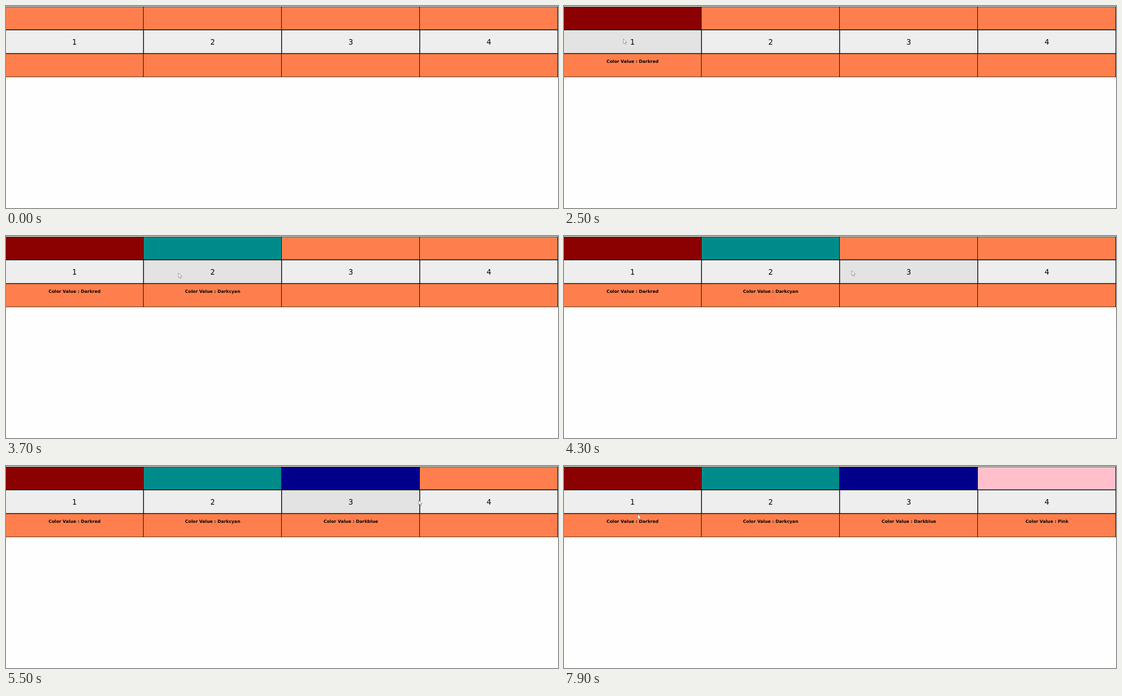
An HTML page for the animation above (8000 ms loop, 999 by 366 pixels).

```html
<!DOCTYPE html>
<html lang="en">
<head>
<meta charset="utf-8">
<title>Color buttons</title>
<style>
  html, body { margin: 0; width: 100%; height: 100%; overflow: hidden; background: #fefefe; }
  svg { display: block; }
  text { font-family: "DejaVu Sans", sans-serif; text-anchor: middle; fill: #000; }
  .digit { font-size: 13.3px; }
  .label { font-size: 7.8px; font-weight: bold; }
</style>
</head>
<body>
<svg id="stage" width="999" height="366" viewBox="0 0 999 366"></svg>
<script>
const stage = document.getElementById('stage');
const LOOP = 8000, STEP = 100, GLIDE = 1000, REACTION = 200;
const COLUMN = 250, ROW = 43;
const CORAL = '#fe7f4d', IDLE = '#eee', HOVER = '#e3e3e3';

// Each name is also the CSS colour; x and y are where the button is clicked.
const choices = [
  { name: 'Darkred', x: 95, y: 59, click: 2000 },
  { name: 'Darkcyan', x: 310, y: 67, click: 3500 },
  { name: 'Darkblue', x: 562, y: 62, click: 4800 },
  { name: 'Pink', x: 833, y: 62, click: 6100 }
];

function add(tag, attrs, content = '') {
  const el = document.createElementNS('http://www.w3.org/2000/svg', tag);
  for (const key in attrs) el.setAttribute(key, attrs[key]);
  el.textContent = content;
  stage.append(el);
  return el;
}

const rect = (x, y, width, height, fill) => add('rect', { x, y, width, height, fill });

const cells = choices.map(({ name }, i) => {
  const left = COLUMN * i - 1, center = COLUMN * i + 124;
  const [top, button] = [CORAL, IDLE, CORAL].map((fill, row) =>
    rect(left, Math.max(1, ROW * row), COLUMN, ROW, fill));
  add('text', { x: center, y: 70, class: 'digit' }, i + 1);
  const label = add('text', { x: center, y: 102.5, class: 'label' }, `Color Value : ${name}`);
  return { left, top, button, label };
});

// Thin outer grid, heavier frame around the buttons
for (const y of [1, 128]) rect(0, y, 999, 1, '#443');
for (const y of [ROW, 2 * ROW]) rect(0, y - .5, 999, 1.5, '#111');
for (const { left } of cells) {
  const x = left + COLUMN - 1;
  rect(x, 1, 1, 128, '#111');
  rect(x, ROW, 1.5, ROW, '#111');
}

const pointer = add('path', {
  d: 'M0 0V8.6L2 6.9L3.5 10L5 9.3L3.6 6.3H6.3Z',
  fill: '#fff', stroke: '#808080', 'stroke-width': .8
});

const moves = [
  { x: 100, y: 128, start: 100, end: 900 },
  ...choices.map(({ x, y, click }, i) => {
    const end = i ? click - REACTION : 1400;
    return { x, y, start: i ? end - GLIDE : 1000, end };
  }),
  { x: 133.5, y: 87.5, start: 7400, end: 7900 }
];

const ease = u => u * u * u * (u * (6 * u - 15) + 10);

function pointerAt(time) {
  let x = 230, y = 370;
  for (const move of moves) {
    const u = (time - move.start) / (move.end - move.start);
    const amount = ease(Math.min(1, Math.max(0, u)));
    x += (move.x - x) * amount;
    y += (move.y - y) * amount;
  }
  return [x, y];
}

function draw() {
  const time = Math.floor(performance.now() % LOOP / STEP) * STEP;
  const [x, y] = pointerAt(time);
  pointer.setAttribute('transform', `translate(${x} ${y})`);
  cells.forEach(({ left, top, button, label }, i) => {
    const chosen = time >= choices[i].click;
    const hovered = y > ROW && y < 2 * ROW && x >= left && x < left + COLUMN;
    top.setAttribute('fill', chosen ? choices[i].name.toLowerCase() : CORAL);
    button.setAttribute('fill', hovered ? HOVER : IDLE);
    label.setAttribute('visibility', chosen ? 'visible' : 'hidden');
  });
  requestAnimationFrame(draw);
}
draw();
</script>
</body>
</html>
```
